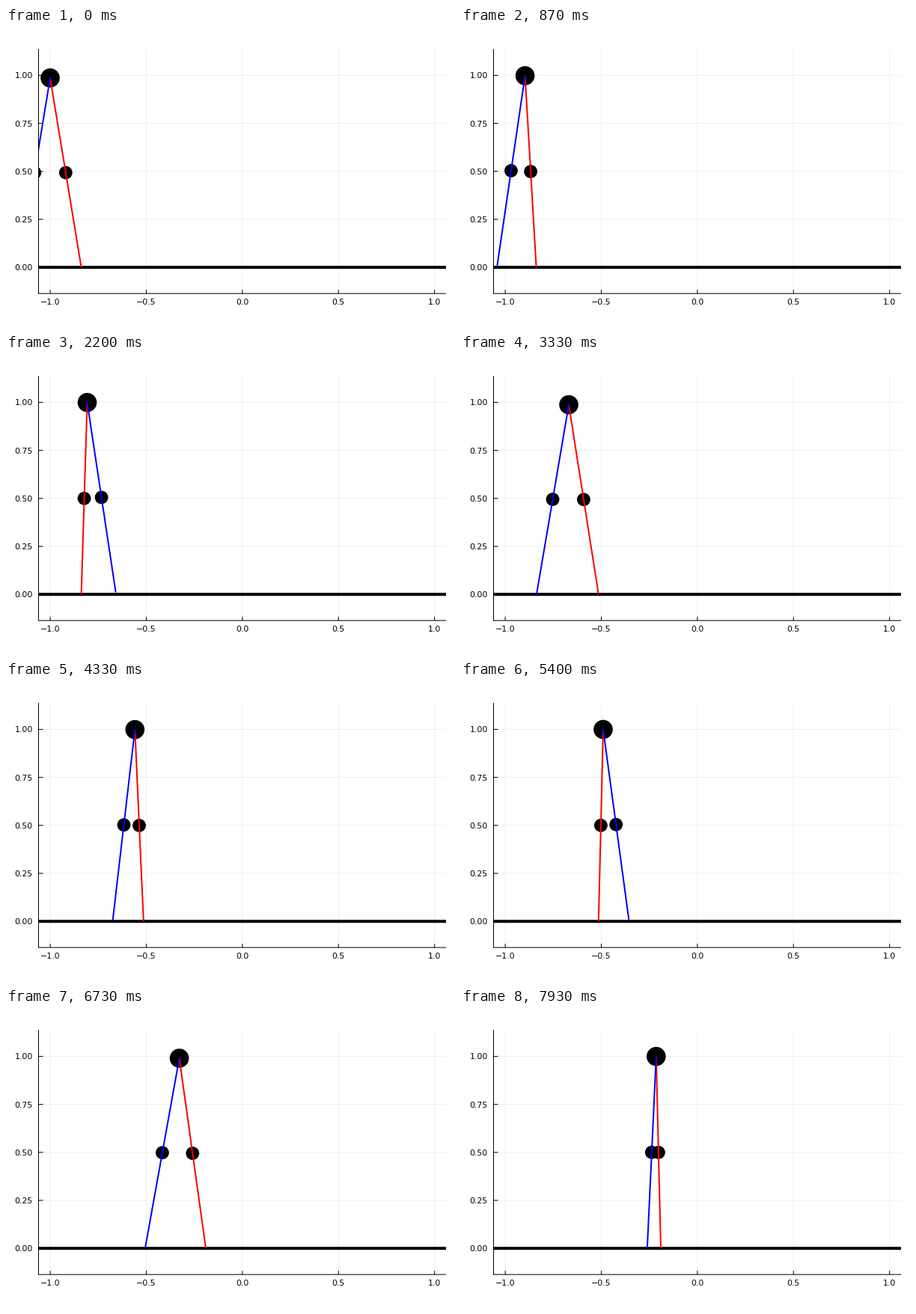
Animation of 600 by 400 pixels, one loop 8000 ms. Source, as a matplotlib script:

```python
import numpy as np
import matplotlib.pyplot as plt
from matplotlib.animation import FuncAnimation
from matplotlib.patches import Circle, Rectangle

W, H, DPI = 600, 400, 100
POSES, LOOP = 120, 8000
FRAMES = 2 * POSES

# Plot area and data-to-pixel mapping
LEFT, RIGHT, TOP, BOTTOM = 43.5, 588, 28, 355.2
X0, Y0, LEG = 315.9, 320.2, 256.8

# Gait: one step lasts PERIOD seconds and advances STRIDE pixels
PERIOD, FOOT, HALF = 3.29, 100.6, 41.6
STRIDE = 2 * HALF


def px(points):
    return points * 72 / DPI


def hip_offset(s):
    """Hip relative to the standing foot, s from -1 to 1 over a step."""
    return 25.7 * s + 15.9 * s**3 - 1.6 * np.cos(np.pi * s / 2)


def swing_offset(s):
    """Swinging foot relative to the hip."""
    q = s * s
    sway = s * (108.9 - 112.8 * q + 73.2 * q**2 - 27.7 * q**3)
    return sway + 7.3 * np.cos(np.pi * s / 2)**2


def pose(t):
    step, phase = divmod(t, PERIOD)
    s = 2 * phase / PERIOD - 1
    lean, swing = hip_offset(s), swing_offset(s)
    stand = np.array([FOOT + step * STRIDE, Y0])
    hip = stand + [lean, -np.sqrt(LEG**2 - lean**2)]
    free = hip + [swing, np.sqrt(LEG**2 - swing**2)]
    return hip, stand, free


fig = plt.figure(figsize=(W / DPI, H / DPI), dpi=DPI, facecolor="white")
ax = fig.add_axes([0, 0, 1, 1])
ax.set_xlim(0, W)
ax.set_ylim(H, 0)
ax.axis("off")


def line(xs, ys, color, width, z):
    return ax.plot(xs, ys, color=color, lw=px(width), zorder=z,
                   solid_capstyle="butt", snap=False)[0]


def label(x, y, text, ha):
    ax.text(x, y, text, ha=ha, va="center_baseline", fontsize=px(11),
            family="DejaVu Sans", color="black")


for v in np.linspace(-1, 1, 5):
    x = X0 + v * LEG
    line([x, x], [TOP, BOTTOM], "#eeeeee", 1, 1)
    line([x, x], [BOTTOM, BOTTOM - 5], "black", 1, 2)
    label(x, 366.3, f"{v:.1f}".replace("-", "\u2212"), "center")

for v in np.linspace(0, 1, 5):
    y = Y0 - v * LEG
    line([LEFT, RIGHT], [y, y], "#eeeeee", 1, 1)
    line([LEFT, LEFT + 6], [y, y], "black", 1, 2)
    label(35.7, y, f"{v:.2f}", "right")

line([LEFT, LEFT], [TOP, BOTTOM + .5], "black", 1, 2)
line([LEFT, RIGHT], [BOTTOM, BOTTOM], "black", 1, 2)
line([LEFT, RIGHT], [Y0, Y0], "black", 4, 3)

window = Rectangle((LEFT, TOP), RIGHT - LEFT, BOTTOM - TOP,
                   transform=ax.transData)


def mass(radius):
    disc = ax.add_patch(Circle((0, 0), radius, fc="black", lw=0, zorder=4))
    disc.set_clip_path(window)
    return disc


hip_mass, stand_mass, free_mass = mass(12.8), mass(8.9), mass(8.9)
stand_leg = line([], [], "red", 2, 5)
free_leg = line([], [], "blue", 2, 6)
for leg in (stand_leg, free_leg):
    leg.set_clip_path(window)


def update(i):
    # Each pose is held for two frames, centred on its own time
    k = min((i + 1) // 2, POSES - 1)
    hip, stand, free = pose(k * LOOP / POSES / 1000)
    hip_mass.center = hip
    for foot, disc, leg in ((stand, stand_mass, stand_leg),
                            (free, free_mass, free_leg)):
        disc.center = (hip + foot) / 2
        leg.set_data(*zip(hip, foot))
    return hip_mass, stand_mass, free_mass, stand_leg, free_leg


anim = FuncAnimation(fig, update, frames=FRAMES, interval=LOOP / FRAMES,
                     repeat=True, repeat_delay=0)
plt.show()
```
